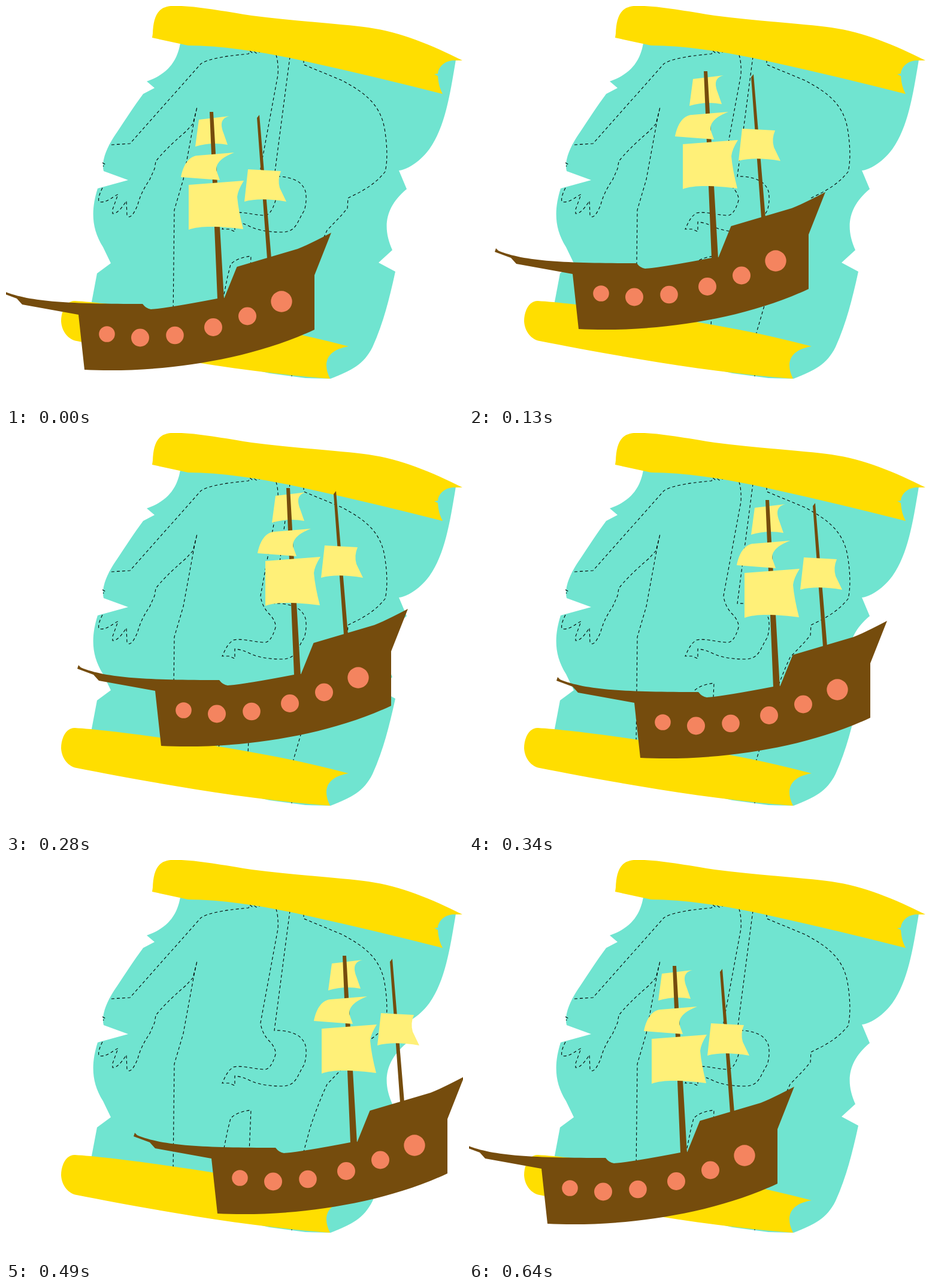
These frames come from a looping animation (763x667 px, 1110 ms). An HTML page:

```html
<!DOCTYPE html>
<html lang="en">
<head>
<meta charset="utf-8">
<title>Ship on a map</title>
<style>
  html, body { margin: 0; width: 100%; height: 100%; overflow: hidden; background: #fff; }
  svg { display: block; width: 763px; height: 667px; }
  .sea { fill: #70e4d0; }
  .roll { fill: #ffde00; }
  .wood { fill: #754c0d; }
  .sail { fill: #fff078; }
  .port { fill: #f4845f; }
  .route { fill: none; stroke: #000; stroke-width: 1.1; stroke-dasharray: 5 4; }
</style>
</head>
<body>
<svg viewBox="0 0 763 667">
  <path class="sea" d="M291 62C287 85 276 112 235 126L248 137L229 147C212 170 200 189 186 210
    C172 230 158 256 163 276L204 291L153 305C142 340 142 371 162 403L175 430L152 447L142 500
    L200 560L440 614L500 622L542 623C577 609 597 600 612 570C630 530 640 490 650 444L622 429
    L645 408C628 370 633 336 669 306L656 275C668 274 690 262 707 239C733 202 741 150 751 90
    L600 60Z"/>

  <g class="route">
    <path d="M176 232L207 230L325 97Q338 86 405 80L407 75L411 78L414 76L418 79L424 77"/>
    <path d="M161 262L166 265L162 268"/>
    <path d="M161 304Q153 320 155 327C166 331 179 318 187 315L178 340V347C186 348 195 335 201 326
      L202 350C207 358 215 345 220 332Q225 312 240 290L248 272L250 260Q262 243 300 210L312 197
      L319 169L314 192L296 290L281 341L279 520"/>
    <path d="M451 82Q455 95 454 115L425 272Q427 290 440 303Q451 315 450 325Q442 352 430 350
      C410 349 395 343 380 346C370 352 366 362 361 373L372 373L382 377V361Q395 362 410 370
      Q430 378 460 378C485 378 485 362 498 342Q503 325 500 310Q497 300 487 293Q470 284 448 285
      L474 85"/>
    <path d="M497 90V98L560 124C600 145 625 165 632 205C637 235 637 260 633 277
      C615 300 590 312 571 321L570 338L560 350L536 375Q520 410 508 447L498 484L480 546L477 619"/>
    <path d="M355 526L370 452L375 432Q385 421 409 418L404 536"/>
  </g>

  <path class="roll" d="M244 53L245 46C246 20 252 2 275 0C310 -2 370 10 410 16C480 25 560 30 605 36
    C660 44 710 65 762 91H750C735 90 722 100 721 113L715 114L721 117C722 130 724 137 729 147
    Q600 114 475 87C420 76 360 66 304 66Z"/>
  <path class="roll" d="M115 493C100 493 92 510 92 527C93 545 105 558 118 560C230 582 400 613 541 623
    C528 597 535 575 572 569Q526 557 480 547C350 520 180 497 115 493Z"/>

  <g id="ship">
    <path class="sail" d="M322 190L373 184C358 188 358 198 363 212L370 232Q343 227 316 235Z"/>
    <path class="wood" d="M340 177H346L364 490H353ZM419 187L423 182L443 422H436Z"/>
    <path class="sail" d="M292 286C296 266 305 251 320 250L381 245C354 255 349 268 352 277L357 291Z"/>
    <path class="sail" d="M305 299L397 292Q387 308 386 319Q388 342 396 373C365 369 325 366 305 374Z"/>
    <path class="sail" d="M404 273L459 276Q453 290 457 304L468 327C440 322 415 322 398 327Z"/>
    <path class="wood" d="M-9 479L-7 473L-3 477C40 495 110 498 228 498Q234 506 242 507Q270 505 353 489
      L364.5 488L385.5 436L487 406Q505 399 543 379L515 450V541C400 595 250 614 131 608L121 516L27 499
      L18 489Z"/>
    <g class="port">
      <circle cx="168.5" cy="548.5" r="13.3"/>
      <circle cx="224" cy="554.5" r="15"/>
      <circle cx="282" cy="550.5" r="14.8"/>
      <circle cx="346" cy="537" r="15"/>
      <circle cx="403" cy="518.5" r="15"/>
      <circle cx="460" cy="494" r="17.7"/>
    </g>
  </g>
</svg>
<script>
  const LOOP = 1110, START = 70, TICK = 30;

  // tick, x, y: straight legs between these points
  const course = [
    [0, 0, 0],
    [5, 87.4, -114],
    [15, 222, -17],
    [20, 0, 0]
  ];

  function place(tick) {
    const i = course.findIndex(p => tick <= p[0]) || 1;
    const [t0, x0, y0] = course[i - 1], [t1, x1, y1] = course[i];
    const u = (tick - t0) / (t1 - t0);
    const x = Math.round(x0 + (x1 - x0) * u);
    const y = Math.round(y0 + (y1 - y0) * u);
    return `translate(${x}px, ${y}px)`;
  }

  // the ship jumps by whole pixels on every tick
  const hold = (ms, tick) => ({
    offset: ms / LOOP, transform: place(tick), easing: 'step-end'
  });
  const frames = [hold(0, 0)];
  for (let k = 1; k <= 20; k++) frames.push(hold(START + (k - 1) * TICK, k));
  frames.push(hold(LOOP, 20));

  document.getElementById('ship').animate(frames, { duration: LOOP, iterations: Infinity });
</script>
</body>
</html>
```
